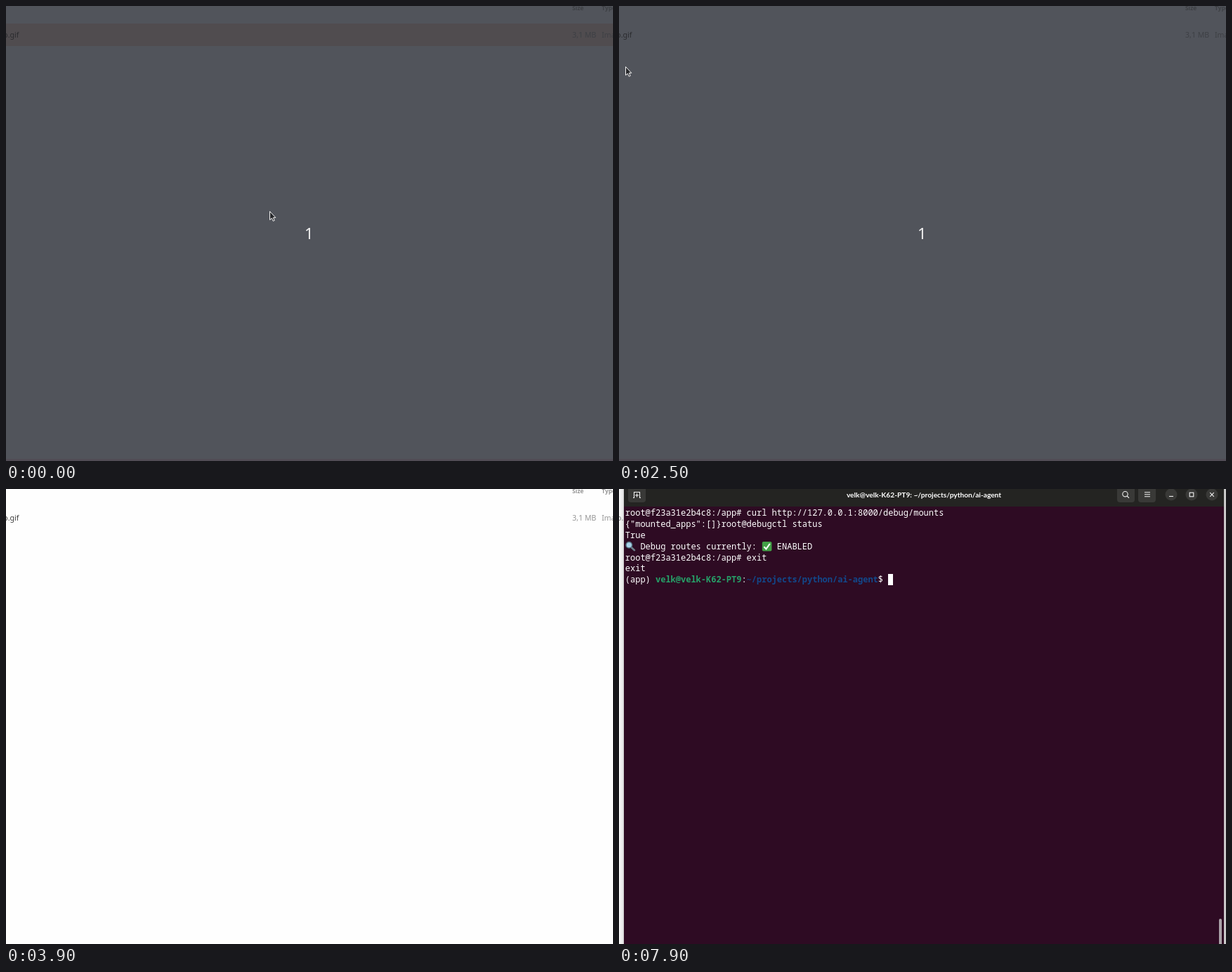
Write an HTML page that moves like this. It is 864 by 648 pixels and loops after 8000 ms.

```html
<!DOCTYPE html>
<html lang="en">
<head>
<meta charset="utf-8">
<title>Screen recording</title>
<style>
  html, body { margin: 0; width: 100%; height: 100%; overflow: hidden; background: #fefefe; }
  svg { display: block; width: 864px; height: 648px; }
  text { white-space: pre; }
  .ui { font: 10.6px "Noto Sans", "Open Sans", sans-serif; }
  .head { font-size: 8.4px; font-weight: 600; }
  .term { font: 12px "Noto Sans Mono", "DejaVu Sans Mono", monospace; fill: #fff; }
  .term .bold { font-weight: 700; }
  .title { font: 700 10.2px Lato, "Open Sans", sans-serif; fill: #fff; }
  .count { font: 22px "Noto Sans", sans-serif; fill: #f3f3f3; }

  .dim, .row, .shell, .caret, .arrow, .beam {
    animation: 8s step-end infinite;
  }
  .dim { animation-name: dim; }
  .row { animation-name: row; }
  .shell { animation-name: shell; }
  .caret { animation-name: caret; }
  .arrow { animation-name: arrow; }
  .beam { animation-name: beam; }

  @keyframes dim { 0% { visibility: visible; } 48.75%, 100% { visibility: hidden; } }
  @keyframes row { 0% { opacity: 1; } 6.25%, 100% { opacity: 0; } }
  @keyframes shell { 0% { opacity: 0; } 70%, 100% { opacity: 1; } }
  @keyframes caret {
    0% { opacity: 1; } 77.5% { opacity: 0; } 85% { opacity: 1; }
    97.5% { opacity: 0; } 98.75%, 100% { opacity: 1; }
  }
  @keyframes arrow {
    0% { transform: translate(375px, 292px); }
    15% { transform: translate(374px, 293px); }
    16.25% { transform: translate(352px, 338px); }
    17.5% { transform: translate(298px, 430px); }
    18.75% { transform: translate(228px, 532px); }
    20% { transform: translate(174px, 602px); }
    21.25% { transform: translate(156px, 622px); }
    26.25% { transform: translate(136px, 634px); }
    27.5% { transform: translate(74px, 450px); }
    28.75% { transform: translate(30px, 273px); }
    31.25% { transform: translate(9px, 86px); }
    32.5% { transform: translate(18px, 59px); }
    33.75% { transform: translate(38px, 190px); }
    35% { transform: translate(64px, 380px); }
    36.25% { transform: translate(88px, 570px); }
    37.5%, 100% { transform: translate(99px, 680px); }
  }
  @keyframes beam {
    0% { transform: translate(0, 680px); }
    77.5% { transform: translate(15px, 269px); }
    78.75% { transform: translate(52px, 262px); }
    81.25% { transform: translate(50px, 276px); }
    82.5% { transform: translate(45px, 298px); }
    83.75% { transform: translate(38px, 320px); }
    85% { transform: translate(34px, 331px); }
    98.75%, 100% { transform: translate(0, 680px); }
  }
</style>
</head>
<body>
<svg viewBox="0 0 864 648">
  <defs>
    <linearGradient id="shade">
      <stop offset="0" stop-color="#fafafa"/>
      <stop offset=".6" stop-color="#e9e9e9"/>
      <stop offset="1" stop-color="#c4c4c4"/>
    </linearGradient>
    <g id="labels" class="ui">
      <text class="head" x="806" y="5.5">Size</text>
      <text class="head" x="848" y="5.5">Type</text>
      <text x="806" y="45">3,1 MB</text>
      <text x="848" y="45">Image</text>
    </g>
    <text id="file" class="ui" x="18.5" y="45" text-anchor="end">o.gif</text>
  </defs>

  <!-- file list -->
  <rect width="864" height="648" fill="#fefefe"/>
  <use href="#labels" fill="#969696"/>
  <use href="#file" fill="#3d3d3d"/>

  <!-- countdown -->
  <g class="dim">
    <rect width="864" height="648" fill="#51545b"/>
    <rect class="row" y="25" width="864" height="32" fill="#504c4f"/>
    <rect y="645" width="864" height="3" fill="#514c55"/>
    <use href="#labels" fill="#3e4045"/>
    <use href="#file" fill="#2b2c2f"/>
    <text class="count" x="425" y="332">1</text>
    <path class="arrow" d="M.5 .5V12.6L3.3 10.2L5.2 14.3L7.2 13.4L5.4 9.4H8.8Z"
      fill="#26272a" stroke="#f4f4f4" stroke-width="1"/>
  </g>

  <!-- terminal -->
  <g class="shell">
    <rect width="8" height="648" fill="url(#shade)"/>
    <text class="ui" x="-3" y="45" fill="#777">o.</text>
    <rect x="861" width="3" height="648" fill="#c9c9c9"/>
    <rect x="7" width="854" height="648" fill="#2e0b23"/>
    <rect x="7" width="854" height="25" fill="#242422"/>

    <g fill="#393937">
      <rect x="13" y="-6" width="25" height="25" rx="4"/>
      <rect x="709" y="-6" width="25" height="25" rx="4"/>
      <rect x="739" y="-6" width="25" height="25" rx="4"/>
      <circle cx="786" cy="8" r="8.5"/>
      <circle cx="815" cy="8" r="8.5"/>
      <circle cx="844" cy="8" r="8.5"/>
    </g>
    <g fill="none" stroke="#f2f2f2" stroke-width="1.1">
      <path d="M20 12.5H21.5V4.5H29.5V12.5H31M25.5 6.5V11.5M23 9H28"/>
      <circle cx="720.5" cy="7.2" r="3.7"/>
      <path d="M723.2 10L726 12.8"/>
      <path d="M748 4.8H756M748 7.8H756M748 10.8H756"/>
      <path d="M783 10.5H789"/>
      <rect x="812.2" y="5.2" width="5.6" height="5.6"/>
      <path d="M841.2 5.2L846.8 10.8M846.8 5.2L841.2 10.8"/>
    </g>
    <text class="title" x="434" y="11.5" text-anchor="middle">velk@velk-K62-PT9: ~/projects/python/ai-agent</text>

    <g class="term">
      <text x="8.8" y="38">root@f23a31e2b4c8:/app# curl http://127.0.0.1:8000/debug/mounts</text>
      <text x="8.8" y="53.9">{"mounted_apps":[]}root@debugctl status</text>
      <text x="8.8" y="69.8">True</text>
      <text x="30.4" y="85.6">Debug routes currently:</text>
      <text x="224.8" y="85.6">ENABLED</text>
      <text x="8.8" y="101.5">root@f23a31e2b4c8:/app# exit</text>
      <text x="8.8" y="117.3">exit</text>
      <text x="8.8" y="133.2">(app) <tspan class="bold" fill="#26a269">velk@velk-K62-PT9</tspan>:<tspan class="bold" fill="#12488b">~/projects/python/ai-agent</tspan>$</text>
    </g>

    <!-- magnifier and check mark -->
    <path d="M18 83.5L22 87.2" stroke="#6d7f8a" stroke-width="2.6" stroke-linecap="round"/>
    <circle cx="14.3" cy="79.8" r="4.3" fill="#a9d3ea" stroke="#587482" stroke-width="1.5"/>
    <rect x="203.8" y="75" width="13.6" height="13.6" rx="1.8" fill="#43a047"/>
    <path d="M206.4 82.2L209.4 85.4L214.8 77.8" fill="none" stroke="#fff" stroke-width="2"/>

    <rect class="caret" x="383" y="121" width="7" height="16" fill="#fff"/>
    <rect x="854" y="612" width="4" height="40" rx="2" fill="#aaa2a8"/>
    <path class="beam" d="M1 .8H3.2L4.5 2L5.8 .8H8M4.5 2V15M1 16.2H3.2L4.5 15L5.8 16.2H8"
      fill="none" stroke="#eee" stroke-width="1.1"/>
  </g>
</svg>
</body>
</html>
```
